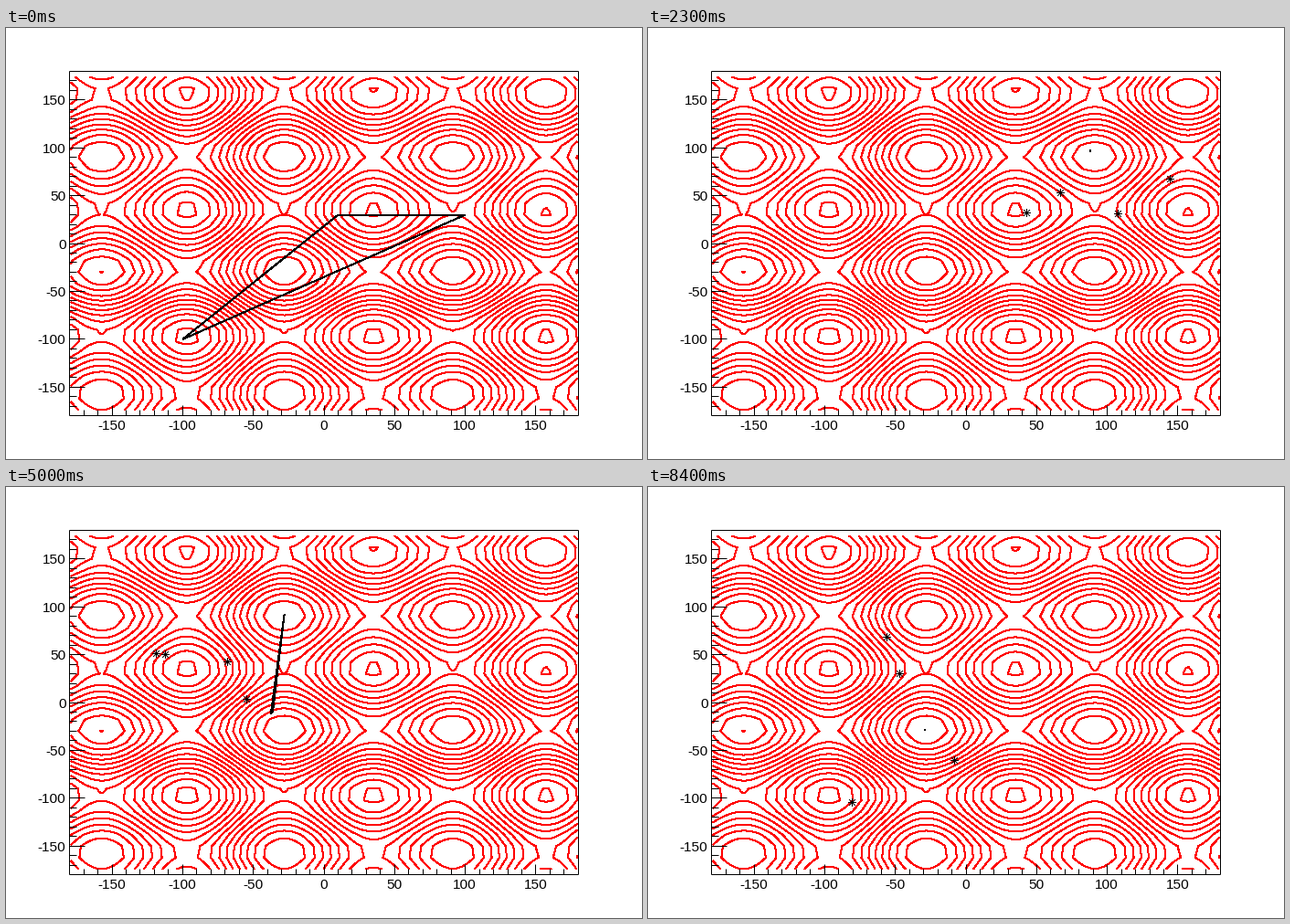
Animation, 696 px wide and 472 px high, one loop 8.5 s. Source, as a matplotlib script:

```python
import numpy as np
import matplotlib.pyplot as plt
from matplotlib.animation import FuncAnimation
from matplotlib.collections import LineCollection
from matplotlib.patches import Polygon, Rectangle

W, H, DPI = 696, 472, 100
FRAMES, STEP = 85, 100
LEFT, RIGHT, TOP, BOTTOM = 69.6, 626.4, 47.2, 424.8
PT = 72 / DPI


def px(x):
    return LEFT + (np.asarray(x) + 180) * (RIGHT - LEFT) / 360


def py(y):
    return BOTTOM - (np.asarray(y) + 180) * (BOTTOM - TOP) / 360


def wave(v):
    v = v - 0.8
    return np.sin(v / 20) - 0.4795 * np.cos(v / 46.6)


def centres(n):
    return -180 + 360 * (np.arange(n) + 0.5) / n


fig = plt.figure(figsize=(W / DPI, H / DPI), dpi=DPI, facecolor="white")
ax = fig.add_axes([0, 0, 1, 1])
ax.set_xlim(0, W)
ax.set_ylim(H, 0)
ax.axis("off")


def strokes(segs, z, snap):
    lines = LineCollection(segs, colors="black", linewidths=PT, zorder=z)
    lines.set_snap(snap)
    return ax.add_collection(lines, autolim=False)


# Contour map: fine in x, coarse in y
gx, gy = centres(200), centres(30)
field = wave(gx)[None, :] + wave(gy)[:, None]
low, high = field.min(), field.max()
levels = low + 1.001 * (high - low) / 20 * np.arange(1, 20)
ax.contour(px(gx), py(gy), field, levels=levels, colors=["#ff0000"],
           linewidths=PT, linestyles="solid", antialiased=False, zorder=1)

# Frame, ticks and labels
l, r, t, b = np.floor([LEFT, RIGHT, TOP, BOTTOM])
segs = [[(l, t), (r, t)], [(r, t), (r, b)], [(r, b), (l, b)], [(l, b), (l, t)]]
for v in range(-170, 180, 10):
    k = 1 if v % 50 == 0 else 0.5
    x, y = np.floor(px(v)), np.floor(py(v))
    segs += [[(x, b), (x, b - 11.3 * k)], [(l, y), (l + 16.7 * k, y)]]
strokes(segs, 2, True)

font = dict(family="Liberation Sans", size=15.4 * PT, color="black", va="baseline")
for v in range(-150, 151, 50):
    ax.text(px(v) - 0.5, 440.5, str(v), ha="center", **font)
    ax.text(65.5, py(v) + 5.5, str(v), ha="right", **font)

# The simplex settles in one well, then hops corner by corner to the next
START = np.array([(10, 30), (100, 30), (-100, -100)])
LEAN, DECAY, LAG = np.array([-10, 28]), 9, 2
FIRST = np.array([91, 90])
SECOND, SECOND_AT = np.array([-28.5, 91]), 36
THIRD, THIRD_AT = np.array([-29, -29]), 47


def corner(n, k):
    fan = (k - 1) * np.array([2, 4])
    if n >= THIRD_AT + LAG * k:
        return THIRD + (LEAN + fan) * np.exp((THIRD_AT - n) / DECAY)
    if n >= SECOND_AT + LAG * k:
        return SECOND + fan * np.exp((SECOND_AT - n) / DECAY)
    rest = FIRST + LEAN * np.exp((11 - n) / DECAY)
    return rest + (START[k] - rest) * 0.5 ** ((n + k) // 3)


def corners(n):
    pts = np.array([corner(n, k) for k in range(3)])
    return np.column_stack([px(pts[:, 0]), py(pts[:, 1])])


def trials(n):
    """Four random trial points scattered around the simplex."""
    if n == 0:
        return []
    rng = np.random.default_rng(500 + n)
    mid = np.clip(corners(n).mean(axis=0), (280, 140), (490, 270))
    found = []
    while len(found) < 4:
        x, y = np.round(rng.normal(mid, (72, 50)))
        if abs(x - mid[0]) < 170 and abs(y - mid[1]) < 115 and y > TOP + 8:
            found.append((x, y))
    return found


def star(x, y):
    x, y = x + 0.5, y + 0.5
    return [[(x - dx, y - dy), (x + dx, y + dy)]
            for dx, dy in ((4.5, 0), (0, 4.5), (3.4, 3.4), (3.4, -3.4))]


simplex = Polygon(corners(0), closed=True, fill=False, edgecolor="black",
                  linewidth=PT, antialiased=False, zorder=4)
simplex.set_snap(False)
ax.add_patch(simplex)
simplex.set_clip_path(Rectangle((LEFT, TOP), RIGHT - LEFT, BOTTOM - TOP,
                                transform=ax.transData))
stars = strokes([], 5, False)


def draw(n):
    simplex.set_xy(corners(n))
    stars.set_segments([s for p in trials(n) for s in star(*p)])
    return simplex, stars


anim = FuncAnimation(fig, draw, frames=FRAMES, interval=STEP,
                     repeat=True, repeat_delay=0, blit=False)
plt.show()
```
